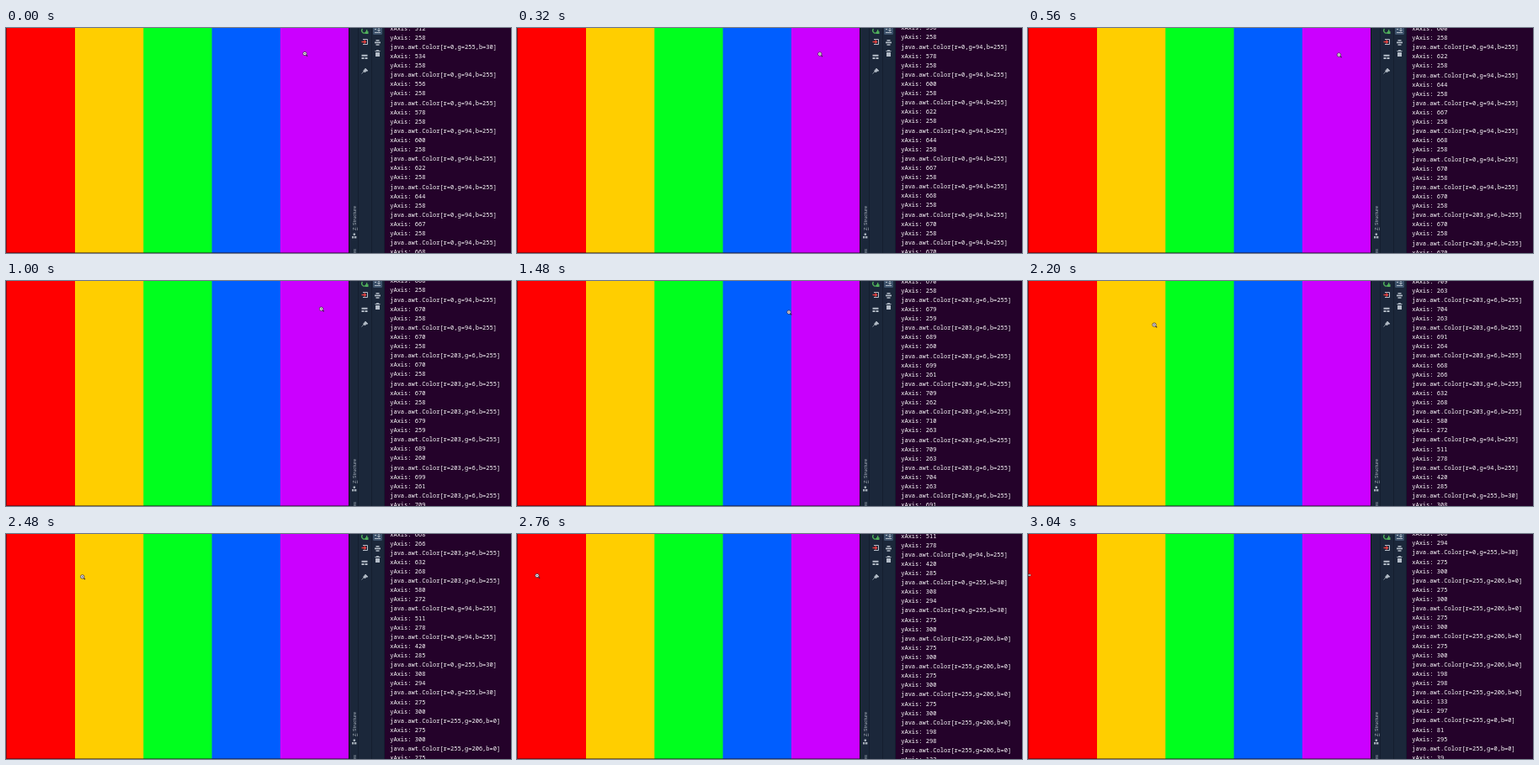
Write an HTML page that moves like this. It is 600 by 268 pixels and loops after 3080 ms.

```html
<!DOCTYPE html>
<html lang="en">
<head>
<meta charset="utf-8">
<style>
  html, body { margin: 0; width: 100%; height: 100%; overflow: hidden; background: #1b273a; }
  svg { position: absolute; left: 0; top: 0; }
  #console { position: absolute; left: 450px; top: 0; width: 150px; height: 268px; overflow: hidden; background: #24022a; }
  pre { position: absolute; left: 6.2px; top: -5.3px; margin: 0; color: #fff;
    font: 500 7.06px/11.11px "Noto Sans Mono", "DejaVu Sans Mono", monospace; }
</style>
</head>
<body>
<svg width="600" height="268" viewBox="0 0 600 268">
  <g id="stripes"></g>
  <path d="M.5 0V267.5H407" fill="none" stroke="#200f1c" stroke-opacity=".5"/>
  <path d="M407.5 0V268" stroke="#10101c"/>
  <path d="M418.5 0V268M434.5 0V268M449.5 0V268" stroke="#141e2f"/>

  <!-- run toolbar -->
  <g fill="none" stroke="#b4bdc8">
    <path d="M423.5 1a3 3 0 1 0 5 1" stroke="#4fae5b" stroke-width="1.4"/>
    <path d="M427 4h3.5v3H427z" fill="#4fae5b" stroke="none"/>
    <path d="M424 13.5h5.5v6H424"/>
    <path d="M422.5 16.5h5M425.5 14.5l2 2-2 2" stroke="#e0413f" stroke-width="1.3"/>
    <path d="M422.5 32.8h7M422.5 36h3M426.5 36h3" stroke-width="2"/>
    <path d="M427 48l3 3-2 .3-1.6 1.7-2-2 1.7-1.6zM425 52l-2.5 2.5" fill="#b4bdc8" stroke-width=".7"/>
    <rect x="436" y="-4" width="11" height="12" rx="1.5" fill="#3d526b" stroke="none"/>
    <path d="M438 1.5h2M438 5.5h7M443 0v4M441.5 2.5l1.5 1.5 1.5-1.5"/>
    <path d="M439.5 14.8h4M438 17.4h7M439.5 20h4" stroke-width="1.6"/>
    <path d="M438.5 27.5h6M440 26.7h3"/>
    <path d="M439 29h5v5h-5z" fill="#b4bdc8" stroke="none"/>
  </g>

  <!-- side tabs -->
  <g fill="#a3adb7" font-family="Roboto, 'Open Sans', sans-serif" font-size="5.6">
    <text transform="translate(416 241) rotate(-90)"><tspan text-decoration="underline">Z</tspan>: Structure</text>
    <text transform="translate(416 269) rotate(-90)">es</text>
    <path d="M411 248h2.4v2.4H411zM414 248h2.4v2.4H414zM412.6 244.6h2.4v2.4h-2.4z"/>
  </g>

  <g id="lens" stroke="#33263c">
    <path d="M1.6 1.6L3.2 3.2" stroke-width="1.2"/>
    <circle r="2.2" fill="#fff" stroke-width=".8"/>
    <circle r=".8" fill="#55465c" stroke="none"/>
  </g>
  <path id="resize" d="M-3 0l2-2v1.3h2V-2l2 2-2 2V.7h-2V2z" fill="#fff" stroke="#222" stroke-width=".6"/>
</svg>
<div id="console"><pre id="log"></pre></div>

<script>
const LOOP = 3080, RECORD = 11.11 * 3, LEAD = 10;
const $ = id => document.getElementById(id);

$("stripes").innerHTML = ["#f00", "#ffce00", "#00ff1e", "#005eff", "#cb00ff"]
  .map((c, i) => `<rect x="${i && .7 + i * 81.3}" width="82" height="268" fill="${c}"/>`).join("")
  + '<rect x="407" width="2" height="268" fill="#1b273a"/>';

const linear = u => u;
const easeIn = u => u ** 2.8;
const easeOut = u => 1 - (1 - u) ** 2;

// Mouse path by sample number: [sample, x, y, ease on the way there]
const path = [[0, 512, 258], [7, 667, 258], [9, 670, 258], [12, 670, 258], [16, 709, 262],
  [17, 710, 263], [26, 308, 294, easeIn], [27, 275, 300], [30, 275, 300], [37, -13, 294, easeOut]];

function mouse(sample) {
  const n = Math.max(1, path.findIndex(k => k[0] >= sample));
  const [i0, x0, y0] = path[n - 1], [i1, x1, y1, ease = linear] = path[n];
  const u = ease((sample - i0) / (i1 - i0));
  return [x0 + (x1 - x0) * u, y0 + (y1 - y0) * u];
}

// The colour lags behind while the mouse moves right
const colors = ["r=255,g=0,b=0", "r=255,g=206,b=0", "r=0,g=255,b=30", "r=0,g=94,b=255", "r=203,g=6,b=255"];
$("log").textContent = Array.from({ length: 36 }, (_, i) => {
  const [x, y] = mouse(i).map(Math.floor);
  const stripe = Math.floor((x + (i < 10 ? -56 : 14)) / 157);
  return `xAxis: ${x}\nyAxis: ${y}\njava.awt.Color[${colors[stripe]}]`;
}).join("\n");

function draw(now) {
  const t = Math.floor(now % LOOP / 40) * 40;
  const progress = .5 + .00755 * t + 3.8e-7 * t * t;
  const whole = Math.floor(progress);
  const scroll = whole - 1 + easeOut(Math.min(1, (progress - whole) / .3));
  $("log").style.transform = `translateY(${-scroll * RECORD}px)`;

  const [mx, my] = mouse(Math.min(37, progress + LEAD));
  const x = Math.max(.5, 355 + .519 * (mx - 670)), y = 30.5 + .515 * (my - 258);
  const shown = x < 4 ? "resize" : "lens";
  for (const id of ["lens", "resize"]) {
    $(id).setAttribute("transform", `translate(${x} ${y})`);
    $(id).style.display = id === shown ? "" : "none";
  }
}

const start = performance.now();
function tick() {
  draw(performance.now() - start);
  requestAnimationFrame(tick);
}
tick();
</script>
</body>
</html>
```
